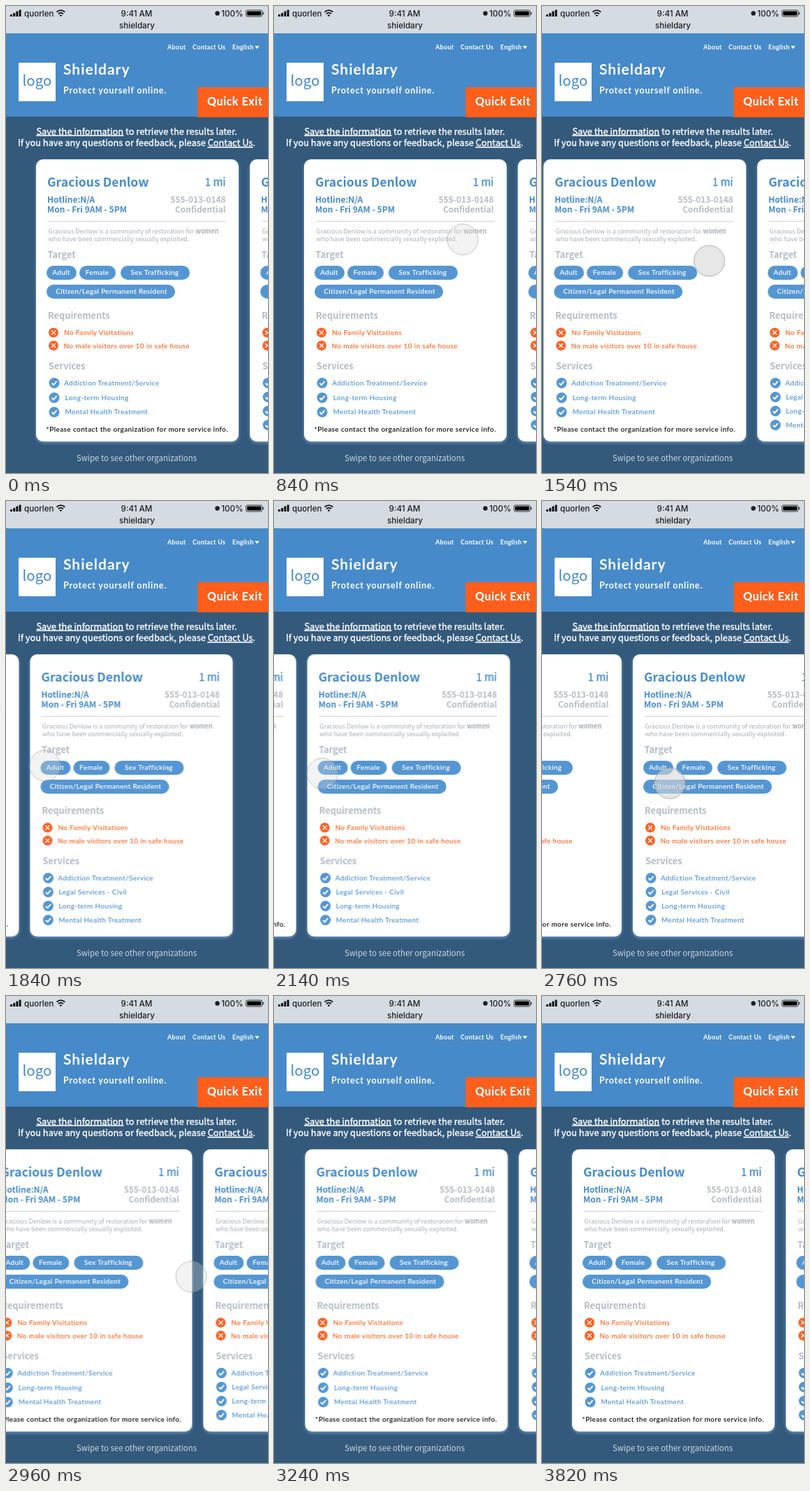
Animation of 375x667 px, one loop 4.14 s. Source, as an HTML page:

```html
<!DOCTYPE html>
<html lang="en">
<head>
<meta charset="utf-8">
<title>Swipeable organization cards</title>
<style>
  html, body { margin: 0; width: 100%; height: 100%; overflow: hidden; background: #33597b; }
  svg { display: block; width: 375px; height: 667px; }

  text { font: 700 10px Lato, sans-serif; fill: #fff; white-space: pre; }
  .status { font: 500 11.6px Inter, sans-serif; fill: #1c1d1f; }
  .nav { font-size: 9px; letter-spacing: .3px; }
  .brand { font-size: 21px; letter-spacing: 1px; }
  .tagline { font-size: 12.5px; letter-spacing: .8px; }
  .exit { font-size: 16px; font-weight: 800; letter-spacing: .5px; }
  .sans { font-family: "Noto Sans CJK SC", "Noto Sans CJK JP", "Noto Sans", sans-serif; }
  .intro { font-size: 12.8px; font-weight: 500; stroke: #fff; stroke-width: .35px; }
  .logo { font-size: 20.5px; font-weight: 400; fill: #4386c6; }
  .hint { font-size: 11.4px; font-weight: 400; fill: #cbd7e2; }
  .title { font-size: 17.6px; fill: #478bcb; }
  .distance { font-size: 15px; font-weight: 400; fill: #478bcb; stroke: #478bcb; stroke-width: .3px; }
  .hours { font-size: 12px; fill: #478bcb; }
  .contact { font-size: 11.9px; fill: #b5bcc4; }
  .about { font-size: 9px; font-weight: 400; fill: #a9afb5; }
  .section { font-size: 12.8px; fill: #b3bcc6; }
  .pill, .rule, .service { font-weight: 600; letter-spacing: .35px; }
  .pill { letter-spacing: .3px; }
  .rule { fill: #ff6a2b; }
  .service { fill: #5796d3; }
  .note { font-weight: 600; letter-spacing: .4px; fill: #111; }
  .center { text-anchor: middle; }
  .right { text-anchor: end; }
  .link { text-decoration: underline; }

  .paper { fill: #fff; filter: drop-shadow(0 2px 2px rgba(140, 186, 230, .65)); }
  .pills rect { fill: #5596d2; }

  .deck { animation: swipe 4140ms infinite; }
  .touch {
    fill: #d8d8d8; stroke: #979797; stroke-width: .8px;
    animation: finger 4140ms infinite, press 4140ms step-end infinite;
  }

  @keyframes swipe {
    0%, 35.51% { transform: translateX(43px); animation-timing-function: linear; }
    37.2% { transform: translateX(3px); animation-timing-function: linear; }
    42.03% { transform: translateX(-195px); animation-timing-function: cubic-bezier(.33, .67, .67, 1); }
    45.41% { transform: translateX(-278px); animation-timing-function: cubic-bezier(.3, 0, .3, 1); }
    59.9%, 62.32% { transform: translateX(-248px); animation-timing-function: cubic-bezier(.33, 0, .67, .33); }
    67.15% { transform: translateX(-160px); animation-timing-function: linear; }
    71.5% { transform: translateX(-24px); animation-timing-function: cubic-bezier(.33, .67, .67, 1); }
    80.68% { transform: translateX(49.5px); animation-timing-function: cubic-bezier(.3, 0, .3, 1); }
    92.27%, 100% { transform: translateX(43px); }
  }
  @keyframes finger {
    0%, 10.14% { transform: translate(399px, 168px); animation-timing-function: ease; }
    14.49%, 19.81% { transform: translate(270px, 333px); animation-timing-function: ease-in-out; }
    26.57%, 35.51% { transform: translate(280px, 364px); animation-timing-function: linear; }
    37.2% { transform: translate(240px, 364px); animation-timing-function: linear; }
    44.44% { transform: translate(56px, 378px); animation-timing-function: ease-out; }
    45.89% { transform: translate(46px, 381px); animation-timing-function: ease-in-out; }
    59.9%, 62.32% { transform: translate(111px, 404px); animation-timing-function: cubic-bezier(.33, 0, .67, .33); }
    67.15% { transform: translate(199px, 403px); animation-timing-function: cubic-bezier(.33, .5, .67, 1); }
    71.5% { transform: translate(265px, 401px); animation-timing-function: linear; }
    73.43% { transform: translate(280px, 394px); animation-timing-function: ease-in; }
    77.78%, 100% { transform: translate(400px, 225px); }
  }
  /* The dot is denser while the finger is down. */
  @keyframes press {
    0%, 42.03%, 67.15%, 100% { fill-opacity: .32; stroke-opacity: .7; }
    31.88%, 62.32% { fill-opacity: .6; stroke-opacity: 1; }
  }
</style>
</head>
<body>
<svg viewBox="0 0 375 667">
  <defs>
    <g id="no">
      <circle r="7" fill="#fb6428"/>
      <path d="M-3-3 3 3M3-3-3 3" stroke="#fff" stroke-width="1.1"/>
    </g>
    <g id="yes">
      <circle r="7.5" fill="#5596d2"/>
      <path d="M-3.6.3-1 2.8 3.6-2.6" fill="none" stroke="#fff" stroke-width="1.9"/>
    </g>

    <g id="card">
      <rect class="paper" y="219" width="290" height="403" rx="10"/>
      <text class="sans title" x="16" y="258">Gracious Denlow</text>
      <text class="sans distance right" x="271.5" y="257">1 mi</text>
      <text class="sans hours" x="16" y="281">Hotline:N/A</text>
      <text class="sans hours" x="16" y="295">Mon - Fri 9AM - 5PM</text>
      <text class="sans contact right" x="271.5" y="281">555-013-0148</text>
      <text class="sans contact right" x="271.5" y="295">Confidential</text>
      <path d="M17 307.5H272" stroke="#cdd1d5"/>
      <text class="sans about" x="17.5" y="325">Gracious Denlow is a community of restoration for <tspan font-weight="700">women</tspan></text>
      <text class="sans about" x="17.5" y="336">who have been commercially sexually exploited.</text>

      <text class="sans section" x="16.5" y="360">Target</text>
      <g class="pills">
        <rect x="15" y="371" width="43" height="20" rx="10"/>
        <rect x="62" y="371" width="52" height="20" rx="10"/>
        <rect x="121" y="371" width="99" height="20" rx="10"/>
        <rect x="15" y="398" width="184" height="20" rx="10"/>
        <text class="pill center" x="36" y="384">Adult</text>
        <text class="pill center" x="87.5" y="384">Female</text>
        <text class="pill center" x="170" y="383.5">Sex Trafficking</text>
        <text class="pill center" x="108" y="411">Citizen/Legal Permanent Resident</text>
      </g>

      <text class="sans section" x="17" y="447">Requirements</text>
      <use href="#no" x="25" y="466.5"/>
      <text class="rule" x="40" y="470">No Family Visitations</text>
      <use href="#no" x="25" y="485"/>
      <text class="rule" x="39.5" y="488.5">No male visitors over 10 in safe house</text>

      <text class="sans section" x="18" y="519">Services</text>
      <use href="#yes" x="26" y="538.5"/>
      <text class="service" x="40" y="541.5">Addiction Treatment/Service</text>
    </g>
  </defs>

  <rect width="375" height="667" fill="#33597b"/>

  <!-- Status bar -->
  <rect width="375" height="39" fill="#d4dbe1"/>
  <path d="M7.5 15v-3M11.7 15v-5M15.9 15v-7.5M20.1 15V5.5" stroke="#111" stroke-width="3"/>
  <text class="status" x="26" y="15">quorlen</text>
  <g fill="none" stroke="#111" stroke-width="1.9">
    <path d="M72.5 8.6a8.3 8.3 0 0 1 11.8 0M74.9 11.2a5 5 0 0 1 7 0"/>
    <path d="M78.4 15.2 76.6 13.2a2.6 2.6 0 0 1 3.6 0Z" fill="#111" stroke="none"/>
  </g>
  <text class="status center" x="187" y="15">9:41 AM</text>
  <circle cx="302.5" cy="10.5" r="3.2" fill="#1c1d1f"/>
  <text class="status right" x="339.5" y="15">100%</text>
  <rect x="343.5" y="6" width="23" height="9" rx="2" fill="none" stroke="#333"/>
  <rect x="345" y="7.5" width="20" height="6" rx=".8"/>
  <path d="M368.3 8.8v3.4" stroke="#333" stroke-width="1.4"/>
  <text class="status center" x="187.5" y="32">shieldary</text>

  <!-- Header -->
  <rect y="39" width="375" height="119" fill="#478ac9"/>
  <text class="nav" x="231" y="62">About</text>
  <text class="nav" x="267" y="62">Contact Us</text>
  <text class="nav" x="324" y="62">English</text>
  <path d="M356 57h6.5l-3.25 4.2Z" fill="#fff"/>
  <rect x="18" y="81" width="53" height="55" fill="#fff"/>
  <text class="sans logo center" x="44.5" y="114">logo</text>
  <text class="brand" x="82" y="98">Shieldary</text>
  <text class="tagline" x="82" y="125">Protect yourself online.</text>
  <rect x="274" y="116" width="101" height="43" fill="#ff5f1b"/>
  <text class="exit" x="288" y="142">Quick Exit</text>

  <text class="sans intro center" x="187" y="183.5"><tspan class="link">Save the information</tspan> to retrieve the results later.</text>
  <text class="sans intro center" x="187" y="200">If you have any questions or feedback, please <tspan class="link">Contact Us</tspan>.</text>
  <text class="sans hint center" x="187" y="650">Swipe to see other organizations</text>

  <g class="deck">
    <g>
      <use href="#card"/>
      <use href="#yes" x="26" y="559.5"/>
      <text class="service" x="41.5" y="562.5">Long-term Housing</text>
      <use href="#yes" x="26" y="580"/>
      <text class="service" x="41.5" y="583">Mental Health Treatment</text>
      <text class="note" x="14.5" y="608">*Please contact the organization for more service info.</text>
    </g>
    <g transform="translate(306)">
      <use href="#card"/>
      <use href="#yes" x="26" y="558.5"/>
      <text class="service" x="41" y="561.5">Legal Services - Civil</text>
      <use href="#yes" x="26" y="578.5"/>
      <text class="service" x="41" y="581.5">Long-term Housing</text>
      <use href="#yes" x="26" y="598.5"/>
      <text class="service" x="41" y="602">Mental Health Treatment</text>
    </g>
  </g>

  <circle class="touch" r="22"/>
</svg>
</body>
</html>
```
